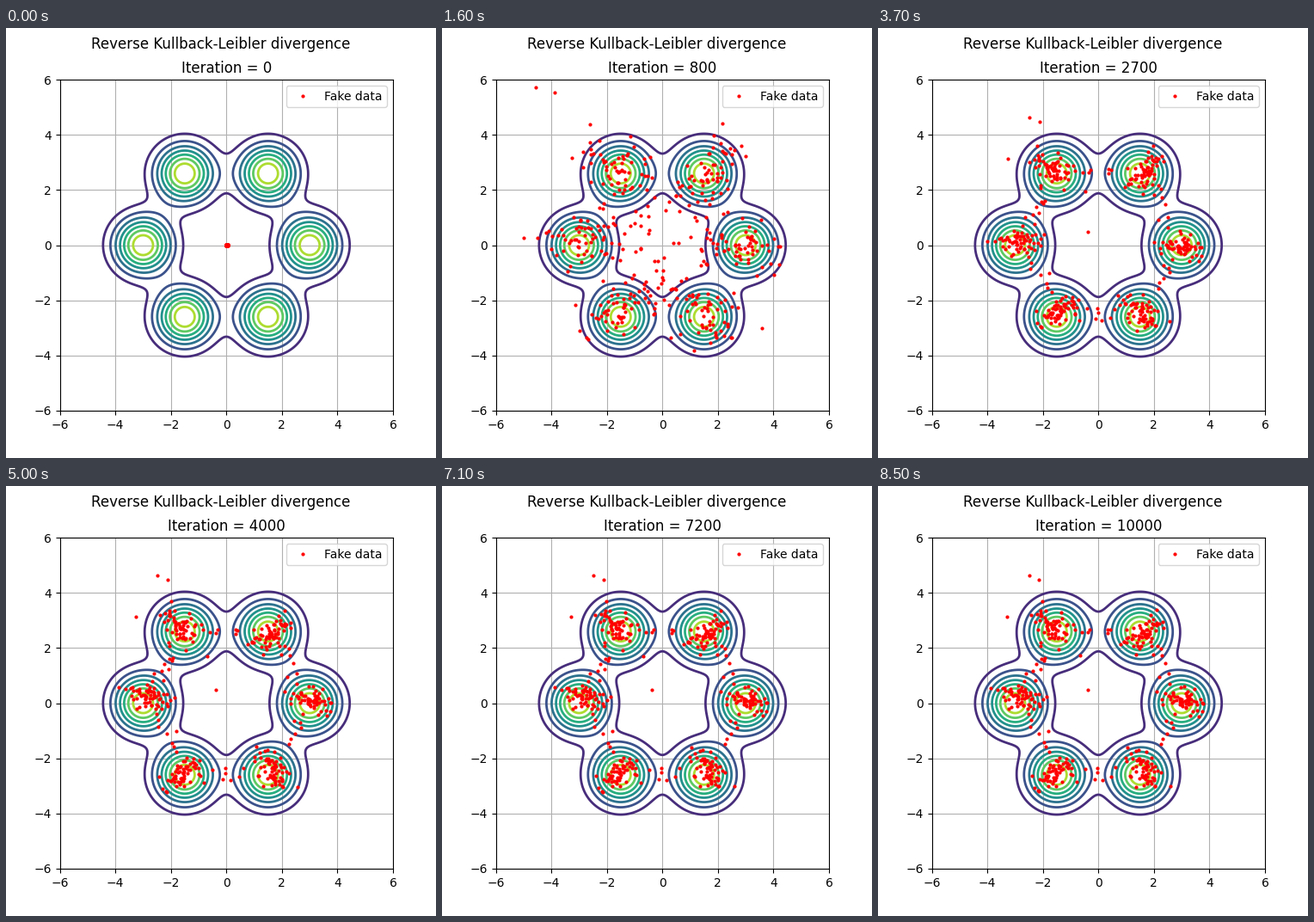
Recreate the animation shown at these times as a matplotlib script. Size 500 px wide and 500 px high, loop 8600 ms.

```python
import numpy as np
import matplotlib.pyplot as plt
from matplotlib.animation import FuncAnimation

FRAMES = 86
PER_MODE, PER_BRIDGE = 57, 11

ANGLES = np.arange(6) * np.pi / 3
MODES = 3 * np.column_stack([np.cos(ANGLES), np.sin(ANGLES)])
# Lone samples that never join a mode.
STRAYS = np.array([(-2.2, 4.35), (-1.85, 4.2), (-3, 2.85), (-.1, .2)])

rng = np.random.default_rng(7)
noise = rng.normal(size=(6, PER_MODE, 2))
mix = np.linspace(.14, .86, PER_BRIDGE)[:, None]
bridge_noise = rng.normal(size=(6, PER_BRIDGE, 2))
inward = rng.uniform(.25, 1.15, (6, PER_BRIDGE, 1))
phase = rng.uniform(0, 2 * np.pi, (6, 3))


def ring(frame):
    """Samples around the six modes; they tighten and keep swaying."""
    wide = np.interp(frame, [16, 27], [1, 0])
    swing = np.sin(.9 * frame + phase)
    means = MODES + .2 * swing[:, :2]

    # Each cluster is a streak pointing roughly away from the middle.
    tilt = (ANGLES + .4 * swing[:, 2])[:, None]
    along = noise[..., 0] * (.45 + .4 * wide)
    across = noise[..., 1] * (.22 + .25 * wide)
    c, s = np.cos(tilt), np.sin(tilt)
    core = means[:, None] + np.stack([c * along - s * across, s * along + c * across], -1)

    # Thin bridges join neighbours and first fill the middle.
    bridge = means[:, None] * (1 - mix) + np.roll(means, -1, axis=0)[:, None] * mix
    bridge = bridge * (.97 * (1 - wide) + inward * wide)
    bridge = bridge + bridge_noise * (.17 + .3 * wide)

    strays = STRAYS * [1 + .95 * wide, 1 + .25 * wide] + .3 * swing[2, :2]
    return np.vstack([core.reshape(-1, 2), bridge.reshape(-1, 2), strays])


def samples(frame):
    # The cloud starts as a speck, swells to the lower right, then fills the ring.
    knots = [0, 2, 9, 16]
    scale_x = np.interp(frame, knots, [.005, .15, .62, 1])
    scale_y = np.interp(frame, knots, [.005, .15, .95, 1])
    shift_x = np.interp(frame, knots, [.02, .3, 2.2, 0])
    shift_y = np.interp(frame, knots, [0, -.1, -1.2, 0])
    x, y = ring(frame).T
    return x * scale_x + shift_x, y * scale_y + shift_y


def iteration(frame):
    return round(np.interp(frame, [0, 20, 60, 85], [0, 1000, 5000, 10000]))


fig, ax = plt.subplots(figsize=(5, 5), dpi=100)
fig.suptitle("Reverse Kullback-Leibler divergence")

axis = np.linspace(-6, 6, 241)
X, Y = np.meshgrid(axis, axis)
density = sum(np.exp(-(X - mx) ** 2 - (Y - my) ** 2) / np.pi for mx, my in MODES)
ax.contour(X, Y, density, levels=np.arange(1, 8) * .04, vmin=0, vmax=.32,
           cmap="viridis", linewidths=2)
dots, = ax.plot([], [], "r.", markersize=4, label="Fake data")
ax.set(xlim=(-6, 6), ylim=(-6, 6), xticks=range(-6, 7, 2), yticks=range(-6, 7, 2))
ax.grid(True)
ax.legend(loc="upper right")
title = ax.set_title("Iteration = 0")


def update(frame):
    dots.set_data(*samples(frame))
    title.set_text(f"Iteration = {iteration(frame)}")
    return dots, title


anim = FuncAnimation(fig, update, frames=FRAMES, interval=100, repeat=True, repeat_delay=0)
plt.show()
```
